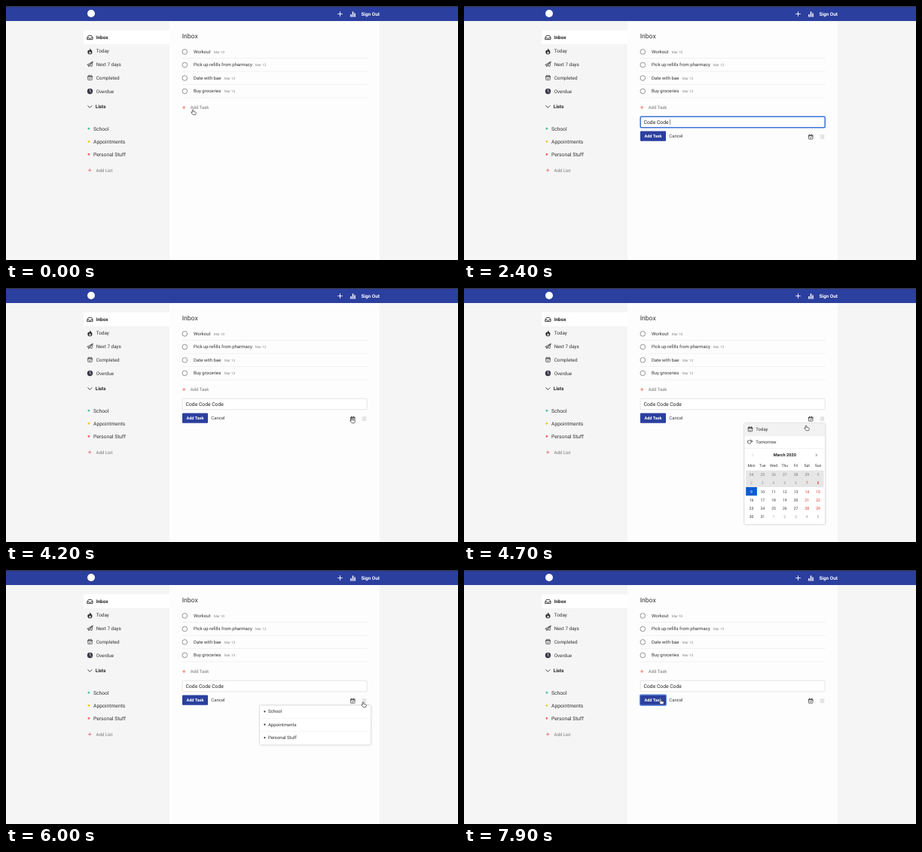
Write an HTML page that moves like this. It is 600 by 338 pixels and loops after 8 s.

```html
<!DOCTYPE html>
<html lang="en">
<head>
<meta charset="utf-8">
<title>Task list</title>
<style>
html, body { margin: 0; width: 100%; height: 100%; overflow: hidden; background: #f5f5f6; }
svg { display: block; width: 100%; height: 100%; }
text { font-family: Roboto, Arial, sans-serif; text-rendering: geometricPrecision; white-space: pre; }
.line { fill: none; stroke-linecap: round; stroke-linejoin: round; }
.pop { filter: drop-shadow(0 .7px 1.3px #0005); }
</style>
</head>
<body>
<svg id="stage" viewBox="0 0 600 338" preserveAspectRatio="none"></svg>
<script>
const stage = document.getElementById('stage');
const ink = '#333', navy = '#2b3f9f', red = '#e0564b';

// y is the middle of the capitals
const text = (x, y, s, size = 6, fill = ink, weight = 400, anchor = 'start') =>
  `<text x="${x}" y="${y + size * .355}" font-size="${size}" fill="${fill}" font-weight="${weight}" text-anchor="${anchor}">${s}</text>`;
const rect = (x, y, w, h, fill, more = '') =>
  `<rect x="${x}" y="${y}" width="${w}" height="${h}" fill="${fill}" ${more}/>`;
const line = (d, color = ink, width = .8, more = '') =>
  `<path class="line" d="${d}" stroke="${color}" stroke-width="${width}" ${more}/>`;
const dot = (x, y, r, fill, more = '') => `<circle cx="${x}" cy="${y}" r="${r}" fill="${fill}" ${more}/>`;
const plus = (x, y, r, color, width) => line(`M${x - r} ${y}h${2 * r}M${x} ${y - r}v${2 * r}`, color, width);
const calendarIcon = (x, y) =>
  `<g transform="translate(${x} ${y})">` +
  rect(-2.8, -2.4, 5.6, 5.4, 'none', `rx=".6" stroke="${ink}" stroke-width=".7"`) +
  line('M-2.8-1.4h5.6', ink, 1) + line('M-1.4-3.4v1M1.4-3.4v1M-1.2.9l.9.9 1.6-1.6', ink, .7) + '</g>';

function header() {
  return rect(0, 0, 600, 20, navy) + rect(0, 0, 600, 1.2, '#34363f') +
    dot(113, 10, 5, '#fff') +
    plus(443.5, 10.6, 2.9, '#fff', .9) +
    line('M458 14v-3M460.5 14v-6.5M463 14v-4.5', '#fff', 1.5, 'style="stroke-linecap:butt"') +
    line('M457 14.2h7', '#fff', .5) +
    text(471.4, 10.6, 'Sign Out', 6.375, '#fff', 700);
}

function sidebar() {
  const nav = ['Inbox', 'Today', 'Next 7 days', 'Completed', 'Overdue'];
  const lists = [['School', '#4bc3a5'], ['Appointments', '#f5c324'], ['Personal Stuff', '#f0645c']];
  return rect(103, 32.5, 114, 18.3, '#fff') +
    nav.map((s, i) => text(119.7, 41.8 + i * 17.95, s, 6.375, i ? ink : '#222', i ? 400 : 700)).join('') +
    line('M108 42l1.4-2.6h4.2l1.4 2.6v2.6h-7zM108 42.2h2l.8 1.2h1.4l.8-1.2h2', ink, .9) +
    '<path d="M111.3 56c.4 1.8 3.2 2.8 3.2 5.2a3.1 3.1 0 0 1-6.2 0c0-1.2.6-2 1.2-2.7l.8.9c.8-.9 1.1-2 1-3.4z" fill="#333"/>' +
    '<path d="M111.5 60.4c1.8 1.4 1.5 3 0 3s-1.6-1.5 0-3z" fill="#f5f5f6"/>' +
    line('M115 74.2l-7.2 4 2 .8 5.2-4.8-1 6.2-2.8-1.1-1.5 1.6v-1.9M111.2 79.3l3.8-5.1', ink, .7) +
    calendarIcon(111.5, 95.4) +
    dot(111.5, 113.5, 3.7, '#3a3a48') + line('M111.5 111v2.6l1.5 1', '#fff', .7) +
    line('M108.6 132.7l2.7 2.7 2.7-2.7', ink, .9) + text(118.7, 133.9, 'Lists', 6.375, '#222', 700) +
    lists.map(([s, c], i) => dot(109.9, 163.2 + i * 17.1, 1.35, c) + text(116, 163.2 + i * 17.1, s, 6.75)).join('') +
    plus(111.2, 218.6, 1.8, red, .7) + text(119.5, 218.9, 'Add List', 6, '#777');
}

function inbox() {
  const tasks = [['Workout', 10, 275.7], ['Pick up refills from pharmacy', 12, 330.8],
    ['Date with bae', 13, 289.7], ['Buy groceries', 13, 289.7]];
  return rect(217, 20, 279, 318, '#fdfdfd') +
    text(233.7, 39.8, 'Inbox', 8.6) +
    tasks.map(([s, day, x], i) => {
      const y = 60.7 + i * 17.5;
      return dot(237.3, y + .2, 3.3, '#fff', 'stroke="#666" stroke-width=".7"') + text(249, y, s) +
        text(x, y + .4, 'Mar ' + day, 4.65, '#888') + rect(234, y + 8.6, 246, .5, '#e4e4e4');
    }).join('') +
    plus(236.2, 135, 1.8, red, .7) + text(244.7, 135.3, 'Add Task', 6, '#777');
}

function form() {
  return '<g id="form">' +
    rect(234.2, 147.2, 245, 14.6, '#fff', 'id="field" rx="1.2"') +
    text(238.6, 154.7, '', 6.75, '#222').replace('<text', '<text id="entry"') +
    rect(0, 151, .5, 7, '#222', 'id="caret"') +
    rect(233.6, 166, 34.8, 14.2, 'none', 'id="ring" rx="1.6" stroke="#6d9df0" stroke-width="1.6"') +
    rect(234, 166.4, 34, 13.4, navy, 'rx="1"') +
    text(251, 173.1, 'Add Task', 5.625, '#fff', 700, 'middle') +
    text(272.3, 173, 'Cancel', 6, '#444') +
    calendarIcon(460.2, 174.2) +
    line('M474.2 172h3.6M474.2 174h3.6M474.2 176h3.6M472.9 172h.1M472.9 174h.1M472.9 176h.1', '#aaa', .6) +
    '</g>';
}

function calendar() {
  const col = i => 381.5 + i * 14.75;
  let days = '';
  for (let i = 0; i < 42; i++) {
    const n = i < 6 ? 24 + i : i < 37 ? i - 5 : i - 36;
    const weekend = i > 6 && i < 37 && i % 7 > 4;
    const color = i === 14 ? '#fff' : weekend ? '#d93025' : i === 6 ? '#555' : i < 6 ? '#777' : i < 14 || i > 36 ? '#999' : ink;
    days += text(col(i % 7), 248.3 + Math.floor(i / 7) * 11.2, n, 5.1, color, 400, 'middle');
  }
  return '<g id="calendar">' + rect(372.3, 180.2, 107, 134, '#fff', 'class="pop" rx="1"') +
    rect(372.3, 180.2, 107, 16.4, '#f2f2f2', 'id="todayHover"') +
    rect(372.3, 196.6, 107, .5, '#e6e6e6') + rect(372.3, 213, 107, .5, '#e6e6e6') +
    calendarIcon(380, 187.8) + text(387.3, 188.2, 'Today') +
    line('M377 203.2h2l1-.9h1.2l-.5 1.1h2.1v1.1h-2.1l.2 1.6-.9.9h-1.4l-1.6-.7z', ink, .7) + text(387.3, 205, 'Tomorrow') +
    text(425.8, 222.2, 'March 2020', 5.6, '#222', 700, 'middle') +
    line('M384 221l-1.2 1.3 1.2 1.3', '#bbb', .6) + line('M467.2 221l1.2 1.3-1.2 1.3', ink, .7) +
    ['Mon', 'Tue', 'Wed', 'Thu', 'Fri', 'Sat', 'Sun'].map((s, i) => text(col(i), 236.6, s, 5.1, ink, 400, 'middle')).join('') +
    rect(374.2, 242.7, 103.3, 22.3, '#e6e6e6') + rect(374.2, 265, 14.7, 11.3, '#0b5cd5') + days + '</g>';
}

function picker() {
  return '<g id="picker">' + rect(337, 180.2, 147.3, 52.2, '#fff', 'class="pop" rx="1"') +
    rect(337, 180.2, 147.3, 17, '#f2f2f2', 'id="schoolHover"') +
    ['School', 'Appointments', 'Personal Stuff'].map((s, i) => {
      const y = 188.3 + i * 17.4;
      return dot(343.4, y, 1.1, ink) + text(347.9, y, s) + (i < 2 ? rect(337, y + 8.7, 147.3, .5, '#ececec') : '');
    }).join('') + '</g>';
}

const shapes = {
  hand: '<path d="M-.8.5Q0-.5.8.5v2l2.8.6q.9.3.7 1.4l-.7 2.2h-3.5L-2.1 3.9q0-1 1-.6l.3.4z" fill="#fff" stroke="#222" stroke-width=".65" stroke-linejoin="round"/>',
  arrow: '<path d="M0 0v5.8l1.3-1.2.9 2 .9-.4-.9-2h1.8z" fill="#111" stroke="#fff" stroke-width=".35"/>',
  beam: line('M-1.3-2.7q1.3 0 1.3.7v4q0 .7-1.3.7M1.3-2.7q-1.3 0-1.3.7v4q0 .7 1.3.7M-.7.8h1.4', '#333', .55),
  none: ''
};

stage.innerHTML = rect(0, 0, 600, 338, '#f5f5f6') + inbox() + header() + sidebar() + form() + calendar() + picker() + '<g id="pointer"></g>';
const part = id => document.getElementById(id);
const show = (id, on) => part(id).setAttribute('visibility', on ? 'inherit' : 'hidden');

// time, x, y, cursor shape until the next entry
const path = [
  [0, 248, 138, 'hand'], [200, 248, 138, 'hand'], [400, 251, 143, 'arrow'], [500, 254, 148, 'beam'],
  [700, 255.5, 153, 'beam'], [1000, 255.5, 153, 'none'], [3400, 255.5, 153, 'beam'], [3600, 430, 163, 'arrow'],
  [3700, 448.5, 168, 'arrow'], [4000, 457, 172, 'hand'], [4200, 459, 173, 'hand'], [4600, 459, 174, 'hand'],
  [4700, 454, 183, 'hand'], [5000, 454, 184, 'arrow'], [5400, 456, 188, 'arrow'], [5700, 472, 178, 'hand'],
  [5800, 474, 175.7, 'hand'], [6000, 474, 175.7, 'hand'], [6500, 452, 187, 'hand'], [6900, 452, 187, 'arrow'],
  [7400, 275, 174, 'arrow'], [7500, 265, 173, 'hand'], [7600, 265, 173, 'hand'], [7800, 261, 172, 'hand'], [8000, 261, 172, 'hand']
];
const phrase = 'Code Code Code';
const keyTimes = [1000, 1300, 1400, 1500, 1700, 1900, 2000, 2100, 2200, 2400, 2700, 2800, 2900, 3100];
const between = (t, a, b) => t >= a && t < b;

function draw(t) {
  const i = path.findIndex((p, k) => t >= p[0] && t < path[k + 1][0]);
  const [t0, x0, y0, kind] = path[i], [t1, x1, y1] = path[i + 1];
  const k = (t - t0) / (t1 - t0);
  part('pointer').innerHTML = shapes[kind];
  part('pointer').setAttribute('transform', `translate(${x0 + (x1 - x0) * k} ${y0 + (y1 - y0) * k})`);

  const focused = t < 4200;
  show('form', t >= 200);
  part('field').setAttribute('stroke', focused ? '#3a72d8' : '#d4d4d4');
  part('field').setAttribute('stroke-width', focused ? 1.5 : .6);

  const entry = part('entry');
  entry.textContent = phrase.slice(0, keyTimes.filter(key => key <= t).length);
  part('caret').setAttribute('x', 238.8 + (entry.textContent ? entry.getComputedTextLength() : 0));
  show('caret', between(t, 200, 3600) || between(t, 4100, 4200));

  show('calendar', between(t, 4300, 5000));
  show('todayHover', between(t, 4700, 5000));
  show('picker', between(t, 6000, 6900));
  show('schoolHover', between(t, 6200, 6900));
  part('ring').setAttribute('opacity', Math.min(1, Math.max(0, (t - 7600) / 200)));
}

const start = performance.now();
function tick() {
  draw(Math.floor((performance.now() - start) % 8000 / 100) * 100);
  requestAnimationFrame(tick);
}
tick();
</script>
</body>
</html>
```
